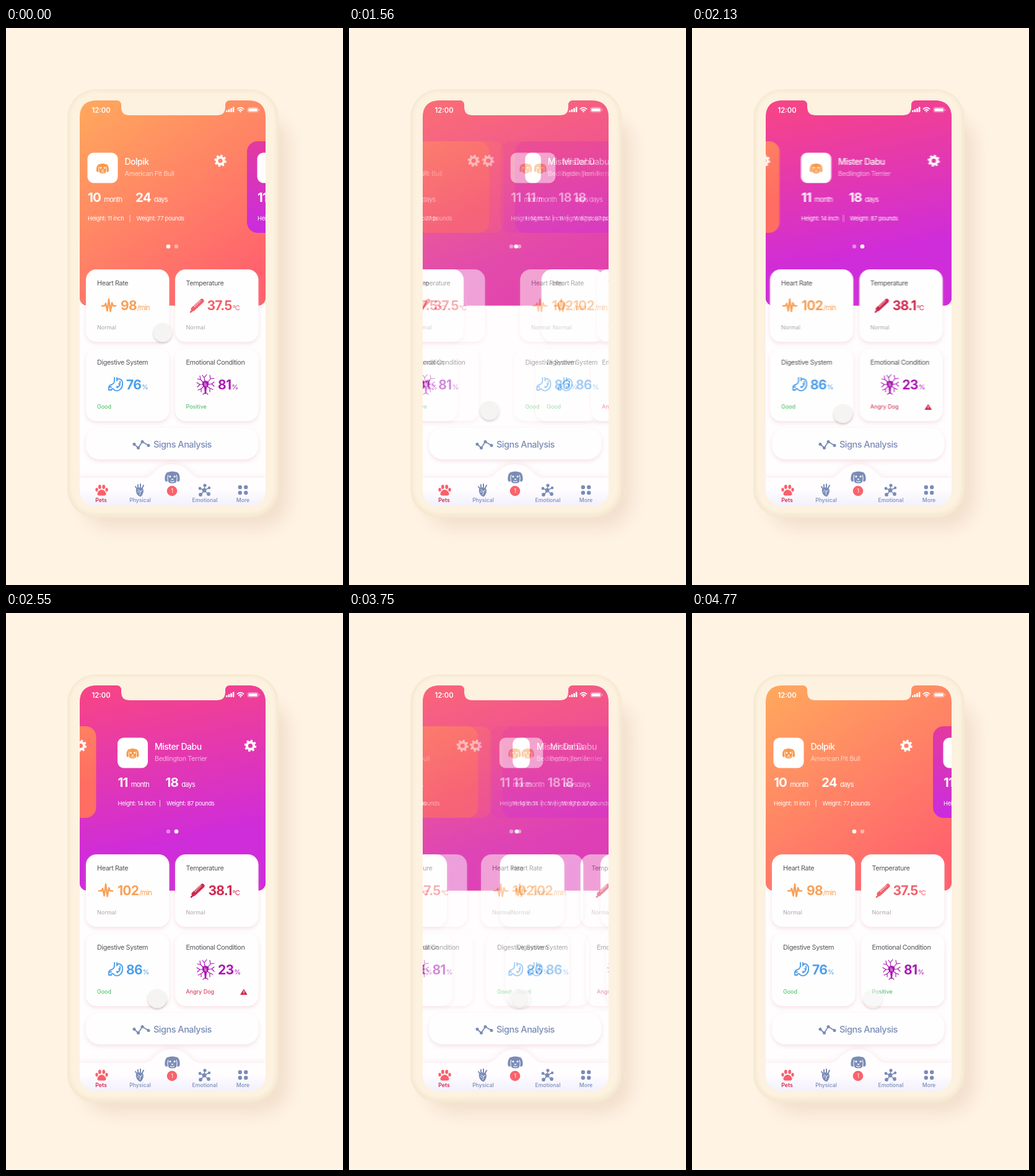
These frames come from a looping animation (544x900 px, 4800 ms). An HTML page:

```html
<!DOCTYPE html>
<html lang="en">
<head>
<meta charset="utf-8">
<title>Pet health</title>
<style>
  html, body { margin: 0; width: 100%; height: 100%; overflow: hidden; background: #fff3e4; }
  svg { display: block; width: 544px; height: 900px; }
  text { font-family: Inter, sans-serif; letter-spacing: -.035em; white-space: pre; }
  .wide { letter-spacing: 0; }
  .card { fill: #fffefe; filter: drop-shadow(0 3px 3px rgba(222, 165, 175, .3)); }
  .bar { filter: drop-shadow(0 -2px 4px rgba(235, 180, 190, .25)); }
  .touch { filter: drop-shadow(0 2px 1.5px rgba(90, 80, 80, .28)); }
</style>
</head>
<body>
<svg viewBox="0 0 544 900">
  <defs>
    <linearGradient id="orange" gradientUnits="userSpaceOnUse" x1="119" y1="130" x2="340" y2="440">
      <stop stop-color="#ffa75e"/><stop offset="1" stop-color="#ff626d"/>
    </linearGradient>
    <linearGradient id="purple" gradientUnits="userSpaceOnUse" x1="150" y1="130" x2="200" y2="385">
      <stop stop-color="#f64489"/><stop offset="1" stop-color="#cf2cda"/>
    </linearGradient>
    <linearGradient id="orangeCard" x2=".8" y2=".8">
      <stop stop-color="#ff9c60"/><stop offset="1" stop-color="#ff6d63"/>
    </linearGradient>
    <linearGradient id="purpleCard" x2=".1" y2="1">
      <stop stop-color="#e33a9f"/><stop offset="1" stop-color="#c92ce0"/>
    </linearGradient>
    <linearGradient id="foot" x2="0" y2="1">
      <stop offset=".6" stop-color="#fffdfe"/><stop offset="1" stop-color="#f1f0fd"/>
    </linearGradient>
    <filter id="soft"><feGaussianBlur stdDeviation="2.5"/></filter>
    <filter id="shade" x="-20%" y="-20%" width="140%" height="140%"><feGaussianBlur stdDeviation="13"/></filter>
    <clipPath id="screen">
      <path d="M119 145Q119 117 147 117H178Q186 117 186 125V128Q186 141 199 141H341Q354 141 354 128V125Q354 117 362 117H391Q419 117 419 145V744Q419 772 391 772H147Q119 772 119 744Z"/>
    </clipPath>
  </defs>
  <rect width="544" height="900" fill="#fff3e4"/>
  <rect x="122" y="140" width="336" height="670" rx="50" fill="#dbb9a0" opacity=".32" filter="url(#shade)"/>
  <rect x="99" y="99" width="341" height="692" rx="46" fill="#f5e9d0"/>
  <rect x="103" y="102" width="333" height="683" rx="42" fill="#fdf1e0" filter="url(#soft)"/>
  <g clip-path="url(#screen)">
    <g id="now"></g>
    <g id="before" opacity=".5"></g>
    <g id="chrome"></g>
  </g>
</svg>
<script>
const $ = id => document.getElementById(id);
const GREY = '#7a8cb6', RED = '#d0284e';

const text = (x, y, s, size, fill = '#fff', more = '') =>
  `<text x="${x}" y="${y}" font-size="${size}" fill="${fill}" ${more}>${s}</text>`;
const icon = (x, y, body, color, scale = 1) =>
  `<g transform="translate(${x} ${y}) scale(${scale})" fill="${color}" stroke="${color}" stroke-width="0"
    stroke-linecap="round" stroke-linejoin="round">${body}</g>`;
const dot = (x, y, r, more = '') => `<circle cx="${x}" cy="${y}" r="${r}" ${more}/>`;
const line = (d, width, more = '') => `<path d="${d}" fill="none" stroke-width="${width}" ${more}/>`;

const dog = `<path d="M-5-7Q0-9 5-7C9-7 10.5-1 10 4Q8 7.5 6 4.5Q5 8 0 8T-6 4.5Q-8 7.5-10 4C-10.5-1-9-7-5-7Z"/>
  <g fill="#fff" stroke="#fff">${line('M-6 4.5Q-7 1-5.6-3M6 4.5Q7 1 5.6-3', .9)}
  ${dot(-3, -1, 1.3) + dot(3, -1, 1.3)}<path d="M-2 2H2L0 4Z"/>${line('M-2.5 5.2Q0 6.8 2.5 5.2', .9)}</g>`;
const gear = dot(0, 0, 5.6, 'fill="none" stroke-width="4"') +
  dot(0, 0, 8, 'fill="none" stroke-width="3.4" stroke-linecap="butt" stroke-dasharray="3.14"');
const pulse = line('M-11 1H-7L-5-3L-2.5 9L0-10L2.5 10L5-4L7 1H11', 2.4);
const thermo = line('M-6 6L8-7', 7) + line('M-10 11L-6 7', 2.5) +
  line('M-4 2L6-8', 3, 'stroke="#fff" stroke-linecap="butt" stroke-dasharray="1 1.7"');
const stomach = line(`M-2-11V-6Q-2-2-6 0Q-10 1-11 4V9H-7Q-7 6-4 7Q0 12 6 9Q12 5 11-3Q10-9 5-9Q2-9 2-6V-11
  M7-5Q8 3 2 5M-11 4H-7M5-1L7 0M2 3L3 5`, 1.9);
const neuron = `<path d="M-5-4Q0-8 5-4Q6 2 2 5L1 15H-1L-2 5Q-6 2-5-4Z"/>` +
  line(`M-4-4L-8-8L-13-9M-8-8L-9-14M-4 0L-9 0L-14-3M-9 0L-13 4M-3 3L-7 7L-12 9M-7 7L-7 12
    M4-4L8-9L14-10M8-9L7-15M4 0L10-1L14-4M10-1L14 3M3 3L7 6L12 8M7 6L7 12M-1-5L-2-11L-5-15M-2-11L2-16M0 13L-4 16M0 13L4 16`, 1.2) +
  line('M-1-3V2M1-1V3', 1, 'stroke="#f3c8f5"');
const paw = `<path d="M0-1C4-1 7 3 7 6C7 9 3 8.5 0 8.5S-7 9-7 6C-7 3-4-1 0-1Z"/>
  <ellipse cx="-8" cy="-1" rx="2.2" ry="3"/><ellipse cx="-3.2" cy="-5.6" rx="2.4" ry="3.4"/>
  <ellipse cx="3.2" cy="-5.6" rx="2.4" ry="3.4"/><ellipse cx="8" cy="-1" rx="2.2" ry="3"/>`;
const organ = `<path d="M-5-4Q0-6 5-3Q8 3 2 10Q-1 11-4 7Q-8 1-5-4Z"/>` +
  line('M-3-4V-9M1-5V-10M4-4L6-8M-5-3L-7-6', 2) +
  line('M-3-1L1 2L0 7M1 2L4 0M-2 3L-4 2', .9, 'stroke="#fff"');
const molecule = line('M0 0L-7-3M0 0L1-8M0 0L8-4M0 0L-5 7M0 0L6 6', 1.4) +
  [[0, 0, 3.4], [-7, -3, 2.4], [1, -8, 2.6], [8, -4, 2.2], [-6, 7, 2.9], [7, 6, 2.9]].map(c => dot(...c)).join('');
const warning = `<path d="M0-4L5 4H-5Z" stroke-width="1"/>` + line('M0-1.5V1M0 3V3', 1.2, 'stroke="#fff"');

const titles = ['Heart Rate', 'Digestive System', 'Temperature', 'Emotional Condition'];
const units = ['/min', '%', '°C', '%'];
const icons = [pulse, stomach, thermo, neuron];
const pets = [
  { name: 'Dolpik', breed: 'American Pit Bull', months: 10, days: 24, height: 11, weight: 77, fill: 'orange', x: 0, daysX: 209,
    values: [98, 76, 37.5, 81], valueX: [185, 194, 324.5, 342], iconX: [166, 177, 308, 322],
    colors: ['#f8a056', '#4d9ee9', '#f0616a', '#a818b2'], mood: 'Positive', moodColor: '#3fb957' },
  { name: 'Mister Dabu', breed: 'Bedlington Terrier', months: 11, days: 18, height: 14, weight: 87, fill: 'purple', x: 274, daysX: 209,
    values: [102, 86, 38.1, 23], valueX: [180, 194, 326.5, 342], iconX: [161, 177, 309, 322],
    colors: ['#f8a056', '#4d9ee9', RED, '#a818b2'], mood: 'Angry Dog', moodColor: RED }
];

function header(p) {
  const count = (x, n, unit) => text(x, 280.5, `${n}<tspan dx="5" font-size="11" font-weight="400">${unit}</tspan>`, 20.5, '#fff', 'font-weight="700"');
  return `<g class="head"><rect class="plate" x="115" y="183" width="256" height="148" rx="17" fill="url(#${p.fill}Card)"/>
    <rect x="131.500" y="201.500" width="49" height="49" rx="10" fill="#fff"/>${icon(156, 227, dog, '#f79b4e')}
    ${text(191.5, 221, p.name, 14, '#fff', 'font-weight="500"')}
    ${text(191.5, 239, p.breed, 10.8, '#fff', 'opacity=".62"')}
    ${icon(346, 214.5, gear, '#fff')}
    ${count(132, p.months, 'month') + count(p.daysX, p.days, 'days')}
    ${text(132, 311, `Height: ${p.height} inch`, 9.4) + text(198.5, 311, '|', 9.4) + text(210.5, 311, `Weight: ${p.weight} pounds`, 9.4)}</g>`;
}

function card(p, i) {
  const left = i < 2 ? 129 : 273, top = i % 2 ? 518 : 390, tx = i < 2 ? 147 : 290.5;
  const status = [['Normal', '#aaa4a8'], ['Good', '#3fb957'], ['Normal', '#aaa4a8'], [p.mood, p.moodColor]][i];
  return `<g class="tile"><rect class="card" x="${left}" y="${top}" width="134.500" height="117" rx="17"/>
    ${text(tx, top + 26, titles[i], 10.8, '#57545c')}
    ${icon(p.iconX[i], top + 58, icons[i], p.colors[i])}
    ${text(p.valueX[i], top + 65.5, `${p.values[i]}<tspan font-size="11" font-weight="400" dx="1">${units[i]}</tspan>`, 21, p.colors[i], 'font-weight="700"')}
    ${text(tx, top + 96.5, status[0], 9, status[1], 'class="wide"')}
    ${i == 3 && p.mood == 'Angry Dog' ? icon(384, 612.5, warning, RED) : ''}</g>`;
}

const panel = fill => `<rect class="${fill}" x="119" y="100" width="300" height="348.500" rx="12" fill="url(#${fill})"/>`;

// Builds one copy of the moving content and returns a function that poses it.
function buildScene(root) {
  root.innerHTML = `<rect x="119" y="117" width="300" height="655" fill="#fffdfe"/>` + panel('orange') + panel('purple') +
    pets.map(header).join('') +
    `<g fill="#fff">${dot(262, 353, 3.2, 'opacity=".45"') + dot(275, 353, 3.2, 'opacity=".45"') + dot(262, 353, 3.3, 'class="page"')}</g>` +
    pets.map(p => titles.map((_, i) => card(p, i)).join('')).join('') +
    `<rect class="card" x="129" y="646" width="278.500" height="51" rx="22"/>` +
    dot(0, 0, 15.5, 'class="touch" fill="#f5f4f3"');
  const all = s => [...root.querySelectorAll(s)];
  const [purple] = all('.purple'), [page] = all('.page'), [touch] = all('.touch');
  const heads = all('.head'), plates = all('.plate'), tiles = all('.tile');
  const move = (el, x, y = 0) => el.setAttribute('transform', `translate(${x.toFixed(2)} ${y.toFixed(2)})`);

  return t => {
    const swipe = progress(t, .11, 0), mix = clamp(swipe);
    purple.setAttribute('opacity', mix);
    heads.forEach((h, k) => move(h, pets[k].x - 225.5 * swipe));
    plates.forEach((r, k) => r.setAttribute('opacity', k ? 1 - mix : mix));
    move(page, 13 * mix);
    tiles.forEach((tile, n) => {
      const i = n % 4, p = progress(t, .047 + .0035 * i, 8 - 8 * i);
      move(tile, 350 * ((n > 3) - p));
    });
    const [x, y, o] = touchAt(t);
    move(touch, x, y);
    touch.setAttribute('opacity', o);
  };
}

const clamp = u => Math.min(1, Math.max(0, u));
const smooth = u => (1 - Math.cos(Math.PI * clamp(u))) / 2;
const swing = (t, over) => t < 500 ? (1 + over) * smooth(t / 500) : 1 + over * (1 - smooth((t - 500) / 450));
// 0 shows the first pet, 1 the second; overshoots, then settles.
const progress = (t, over, lag) => swing(t - 1285 - lag, over) - swing(t - 3553 - lag, over);

// time, x, y, opacity
const touchKeys = [[0, 253, 492, .95], [800, 253, 621, .95], [1250, 253, 621, .95], [1600, 225, 618, .95],
  [2150, 244, 623, .95], [3520, 244, 623, .95], [3880, 292, 623, .6], [4800, 292, 623, .5]];
function touchAt(t) {
  const n = touchKeys.findIndex(k => k[0] > t), a = touchKeys[n - 1], b = touchKeys[n];
  const u = smooth((t - a[0]) / (b[0] - a[0]));
  return [1, 2, 3].map(j => a[j] + (b[j] - a[j]) * u);
}

const trend = [[207, 672.5], [213.5, 678.5], [220, 668.5], [230, 674.5]];
const tab = (x, label, color, weight = 500) =>
  text(x, 766, label, 8.7, color, `class="wide" text-anchor="middle" font-weight="${weight}"`);
$('chrome').innerHTML =
  icon(0, 0, line('M' + trend.join('L'), 1.8) + trend.map(([x, y]) => dot(x, y, 2.5)).join(''), GREY) +
  text(238, 677.5, 'Signs Analysis', 14.5, GREY, 'font-weight="500"') +
  `<path class="bar" fill="url(#foot)" d="M119 727H222C240 727 240 705 268 705S296 727 314 727H419V773H119Z"/>` +
  icon(268.5, 726, dog, GREY, 1.2) + dot(268, 748, 8.3, 'fill="#f9636c"') +
  text(268, 751, '1', 8.5, '#fff', 'text-anchor="middle"') +
  icon(154.5, 747, paw, '#f9606b') + icon(216, 747, organ, GREY) + icon(320, 747, molecule, GREY) +
  icon(382.5, 746.5, [-4.7, 4.7].map(x => dot(x, -4.5, 3.2) + dot(x, 4.5, 3.2)).join(''), GREY) +
  tab(153.5, 'Pets', RED, 600) + tab(216.5, 'Physical', GREY) + tab(321, 'Emotional', GREY) + tab(382.5, 'More', GREY) +
  text(138.5, 136.5, '12:00', 11.2, '#fff', 'class="wide" font-weight="600"') +
  icon(355, 136, [0, 1, 2, 3].map(i => `<rect x="${i * 3.6}" y="${-3 - i * 1.8}" width="2.6" height="${3 + i * 1.8}" rx=".8"/>`).join(''), '#fff') +
  icon(378.5, 135, line('M-5.200-4.200Q0-8.500 5.200-4.200M-2.800-1.800Q0-4.200 2.800-1.800', 1.7) + dot(0, 0, 1.2), '#fff') +
  `<rect x="390" y="128.500" width="17" height="7.500" rx="2.300" fill="none" stroke="#fff" stroke-opacity=".6" stroke-width=".8"/>
   <rect x="391.300" y="129.700" width="14.400" height="5.100" rx="1.300" fill="#fff"/><rect x="408.300" y="131" width="1" height="2.600" fill="#fff" opacity=".6"/>`;

const poseNow = buildScene($('now')), poseBefore = buildScene($('before'));
const start = performance.now();
function tick() {
  const t = Math.floor((performance.now() - start) % 4800 / 30) * 30;
  poseNow(t);
  poseBefore(Math.max(0, t - 30));
  requestAnimationFrame(tick);
}
tick();
</script>
</body>
</html>
```
